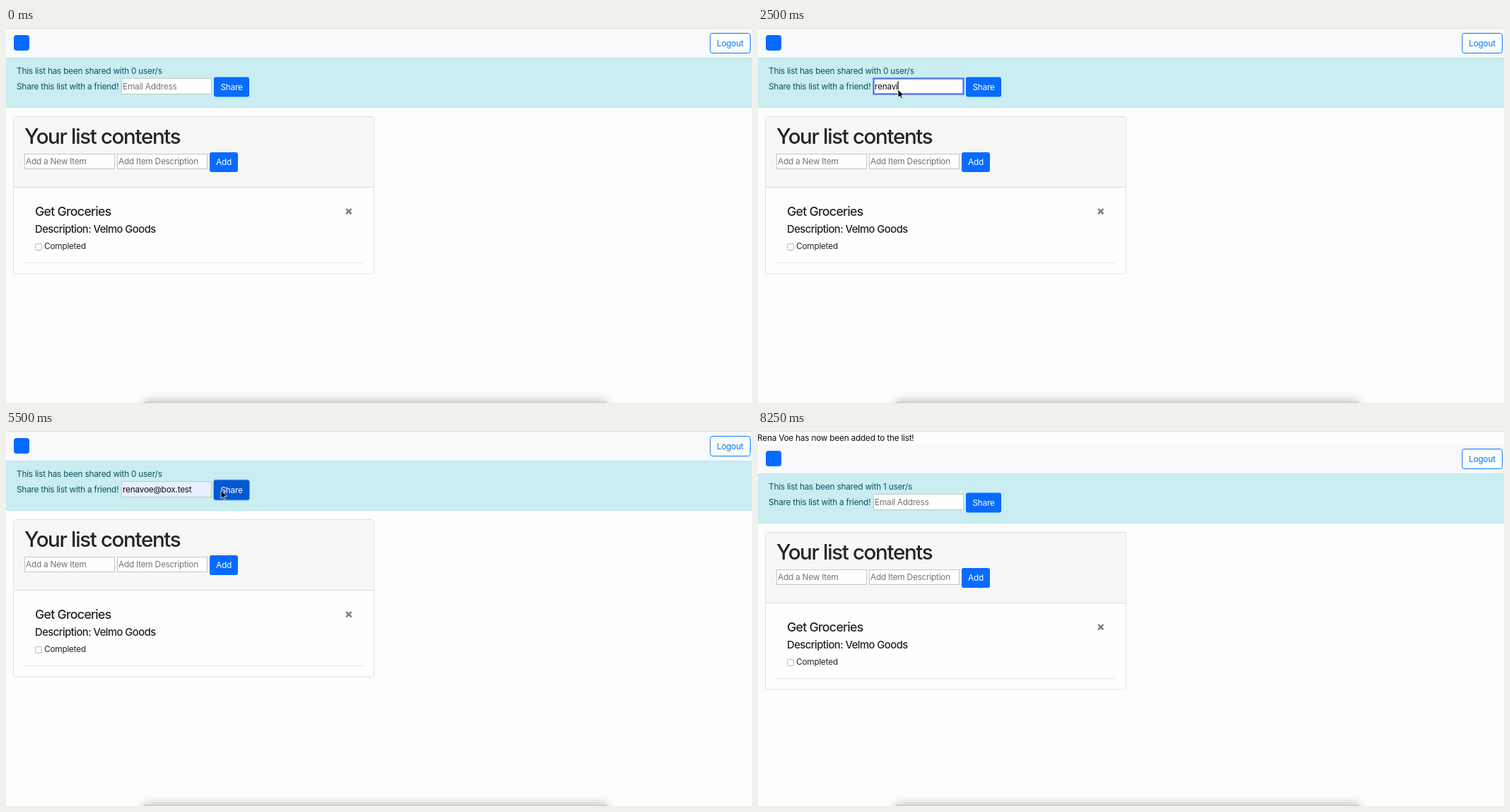
Recreate the animation shown at these times as an HTML page. Size 1055 by 531 pixels, loop 8750 ms.

```html
<!DOCTYPE html>
<html lang="en">
<head>
<meta charset="utf-8">
<title>Shared list</title>
<style>
  html, body { margin: 0; width: 100%; height: 100%; overflow: hidden; background: #fdfdfd; }
  svg { display: block; }
  text { font: 11.85px Inter, "Liberation Sans", sans-serif; letter-spacing: -.02em; fill: #212529; white-space: pre; }
  .info text { fill: #0c5460; }
  .info .hint, .hint { fill: #757575; }
  .info .typed { fill: #111; }
  .info .label, .label { fill: #fff; text-anchor: middle; }
  .outline { fill: #007bff; text-anchor: middle; }
  h1, .h1, .h4, .h5 { font-weight: 500; letter-spacing: -.042em; }
  .h1 { font-size: 29.6px; letter-spacing: -.047em; }
  .h4 { font-size: 17.8px; }
  .h5 { font-size: 14.8px; letter-spacing: -.037em; }
  .btn { fill: #076bff; }
  .input { fill: #fefefe; stroke: #c6c6c6; }
  #menu text { font-size: 9.6px; font-weight: 600; letter-spacing: -.01em; fill: #222; }
</style>
</head>
<body>
<svg width="1055" height="531" viewBox="0 0 1055 531">
  <defs>
    <filter id="soft" x="-20%" y="-200%" width="140%" height="500%"><feGaussianBlur stdDeviation="7"/></filter>
    <filter id="drop" x="-10%" y="-20%" width="120%" height="150%">
      <feDropShadow dx="0" dy="1" stdDeviation="1.2" flood-opacity=".3"/>
    </filter>
  </defs>

  <rect width="1055" height="531" fill="#fdfdfd"/>
  <rect x="195" y="527" width="655" height="24" fill="#000" opacity=".22" filter="url(#soft)"/>
  <rect x="195" y="529" width="655" height="2" fill="#d2d2d2"/>
  <text id="notice" x="-1" y="14" style="fill:#111">Rena Voe has now been added to the list!</text>

  <g id="page">
    <rect y="1" width="1055" height="41" fill="#f8f9fb"/>
    <rect x="11" y="10" width="22" height="22" rx="4" class="btn"/>
    <rect x="996" y="7.5" width="56.5" height="28" rx="3" fill="#fdfdfd" stroke="#007bff"/>
    <text x="1024" y="26" class="outline">Logout</text>

    <g class="info">
      <rect y="42" width="1055" height="71" fill="#c9edf1"/>
      <path d="M0 42.5H1055M0 112.5H1055" stroke="#bce6ea"/>
      <text id="count" x="15" y="65"></text>
      <text x="15" y="87">Share this list with a friend!</text>
      <rect id="field" x="163.5" y="71.5" width="127" height="22" class="input"/>
      <text id="value" x="165" y="87"></text>
      <rect id="caret" y="75" width="1" height="15" fill="#111"/>
      <rect id="ring" x="293" y="68.5" width="52" height="30" rx="4" fill="#72b3f6"/>
      <rect id="share" x="294" y="69.5" width="50" height="28" rx="3" class="btn"/>
      <text x="319" y="88" class="label">Share</text>
    </g>

    <rect x="10.5" y="125.5" width="510" height="222.5" rx="3" fill="#fefefe"/>
    <path id="header" d="M10.5 225V128.5a3 3 0 0 1 3-3H517.5a3 3 0 0 1 3 3V225Z"/>
    <rect x="10.5" y="125.5" width="510" height="222.5" rx="3" fill="none" stroke="#dfdfdf"/>
    <path d="M11 225.5H520" stroke="#dadada"/>
    <text x="26" y="163.5" class="h1">Your list contents</text>
    <rect x="26.5" y="178.5" width="127" height="21" class="input"/>
    <rect x="157.5" y="178.5" width="127" height="21" class="input"/>
    <text x="28" y="193" class="hint">Add a New Item</text>
    <text x="159" y="193" class="hint">Add Item Description</text>
    <rect x="288" y="176" width="40" height="28" rx="3" class="btn"/>
    <text x="308" y="194" class="label">Add</text>

    <text x="41" y="266" class="h4">Get Groceries</text>
    <text x="41" y="290" class="h5">Description: Velmo Goods</text>
    <path d="M481 256l7.4 7.4M488.4 256l-7.4 7.4" stroke="#777" stroke-width="2.4"/>
    <rect x="41.5" y="305.5" width="9" height="9" rx="2" fill="#fff" stroke="#b5b5b5"/>
    <text x="54" y="313">Completed</text>
    <path d="M26 332.5H505" stroke="#e3e3e3"/>
  </g>

  <path d="M0 .5H1055" stroke="#dedede"/>
  <g id="menu"></g>
  <path id="pointer" d="M0 0V11.6L2.7 9.1 4.5 13.1 6.3 12.3 4.6 8.4H8.3Z" fill="#000" stroke="#fff" stroke-width=".8"/>
</svg>
<script>
const LOOP = 8750, STEP = 250, SENT = 5750;
const $ = id => document.getElementById(id);
const show = (id, on) => $(id).setAttribute('visibility', on ? 'visible' : 'hidden');
const set = (id, attrs) => { for (const k in attrs) $(id).setAttribute(k, attrs[k]); };

const emails = ['quillonamberlyn@mail.test', 'rohmvoe@box.test', 'renavoe@box.test',
                'quillon@abc.test', 'pelm.dravori@mail.test', 'reckvoe@box.test'];
const friend = emails[2];
const typing = [[0, ''], [1500, 'r'], [1750, 're'], [2000, 'rena'], [2500, 'renavi'], [2750, 're'],
                [3250, 'ren'], [3500, 'rena'], [3750, 'renav'], [4000, 'renavo'], [4250, friend], [SENT, '']];
const path = [[250, 772, 104], [500, 440, 99], [750, 215, 90], [1000, 198, 87], [4250, 198, 87],
              [5250, 304, 84], [6250, 304, 84], [7500, 204, 76], [8000, 459, 14]];

function pointerAt(t) {
  const i = path.findIndex(p => p[0] >= t);
  if (i < 0) return path.at(-1).slice(1);
  if (i === 0) return path[0].slice(1);
  const [t0, x0, y0] = path[i - 1], [t1, x1, y1] = path[i], k = (t - t0) / (t1 - t0);
  return [x0 + (x1 - x0) * k, y0 + (y1 - y0) * k];
}

function drawMenu(rows) {
  const width = rows.length === emails.length ? 160 : 143;
  $('menu').innerHTML = rows.length ? `<rect x="162.5" y="95" width="${width}" height="${12 + 26.6 * rows.length}"
    rx="2" fill="#fefefe" stroke="#cfcfcf" stroke-width=".8" filter="url(#drop)"/>` +
    rows.map((row, i) => `<text x="172" y="${117.7 + 26.6 * i}">${row}</text>`).join('') : '';
}

function draw(t) {
  const sent = t >= SENT, clicked = t >= 5500 && !sent, focused = t >= 1000 && t < 5500;
  const text = typing.findLast(s => s[0] <= t)[1], filled = text === friend;
  const [x, y] = pointerAt(t);

  set('page', { transform: `translate(0 ${sent ? 18 : 0})` });
  show('notice', sent);
  $('count').textContent = `This list has been shared with ${sent ? 1 : 0} user/s`;
  set('header', { fill: sent && t < 6500 ? '#f1f4f7' : '#f7f7f7' });

  $('value').textContent = text || 'Email Address';
  set('value', { class: text ? 'typed' : 'hint' });
  $('field').style.cssText = (filled ? 'fill:#e8effd;' : '') + (focused ? 'stroke:#5476e6;stroke-width:2.4' : '');
  show('caret', focused);
  set('caret', { x: 165 + (text ? $('value').getComputedTextLength() : 0) });
  drawMenu(focused && !filled ? emails.filter(e => e.startsWith(text)) : []);

  show('ring', clicked);
  $('share').style.fill = clicked ? '#0257d3' : !sent && t >= 5000 && x > 294 ? '#0062e0' : '';
  show('pointer', t >= 250 && t < 8250);
  set('pointer', { transform: `translate(${x} ${y})` });
}

let last = -1;
function tick() {
  const t = Math.floor(performance.now() % LOOP / STEP) * STEP;
  if (t !== last) draw(last = t);
  requestAnimationFrame(tick);
}
tick();
</script>
</body>
</html>
```
